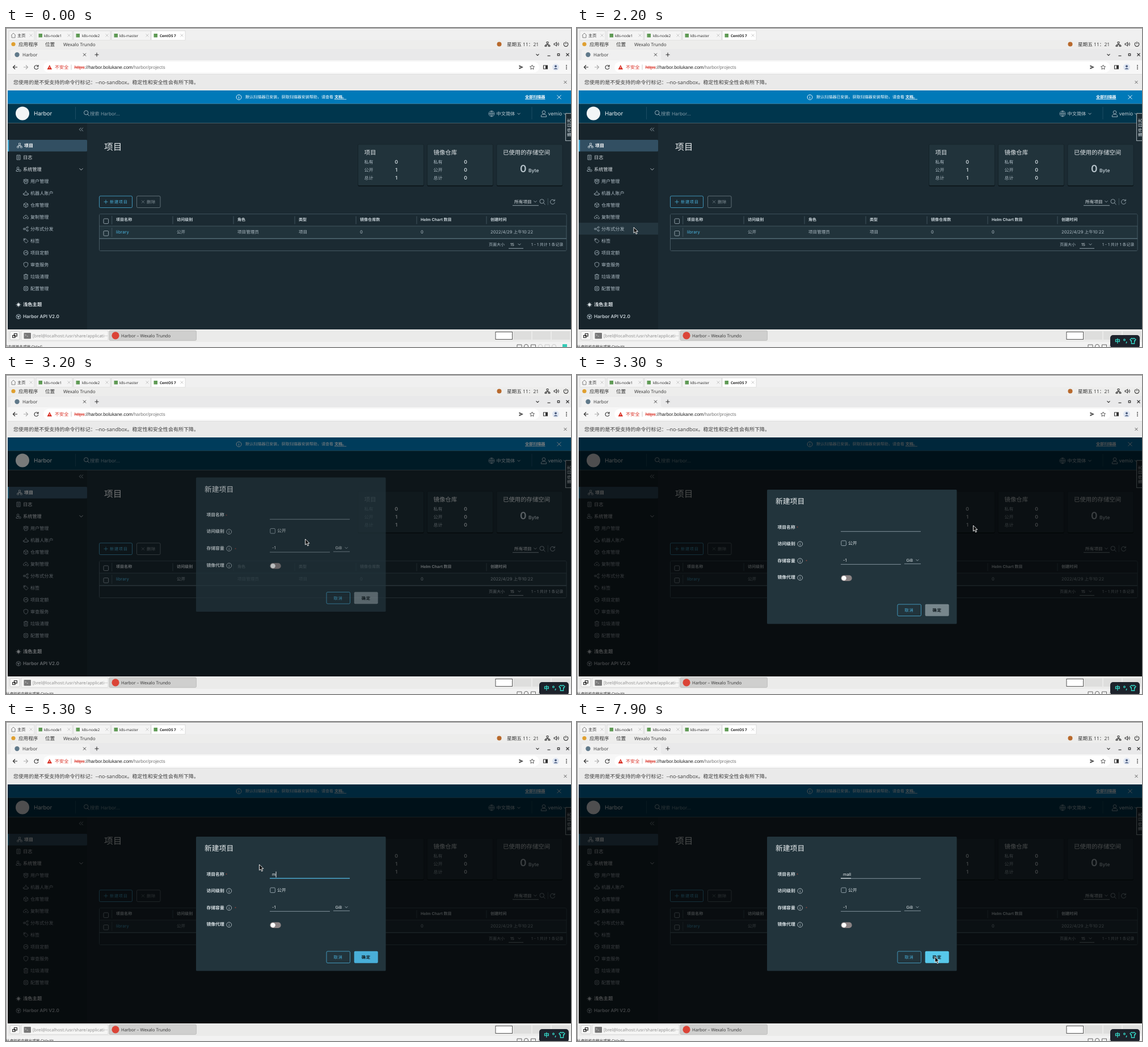
An HTML page that plays this animation: 996x562 px, repeating every 8 s.

```html
<!DOCTYPE html>
<html>
<head>
<meta charset="utf-8">
<title>Harbor</title>
<style>
html, body { margin: 0; width: 100%; height: 100%; overflow: hidden; background: #1b2a32; }
svg { display: block; width: 100vw; height: 100vh; text-rendering: geometricPrecision; }
text { white-space: pre; }
.ui { font-family: Inter, 'Noto Sans CJK SC', 'Noto Sans CJK', sans-serif; }
.os { font-family: 'Open Sans', 'Noto Sans CJK SC', 'Noto Sans CJK', sans-serif; }
.url { font-family: 'Liberation Sans', 'Noto Sans CJK SC', sans-serif; }
</style>
</head>
<body>
<svg id="stage" viewBox="0 0 996 562"></svg>
<script>
const BLUE = '#49afd9', PALE = '#adbbc4', LINE = '#4b5f69', INK = '#333';
const CHEVRON = 'M-2.5-1.2L0 1.3L2.5-1.2', CROSS = 'M-2.5-2.5L2.5 2.5M2.5-2.5L-2.5 2.5';
const ring = (r, x = 0, y = 0) => `M${x - r} ${y}a${r} ${r} 0 1 0 ${2 * r} 0a${r} ${r} 0 1 0 ${-2 * r} 0`;
const SEARCH = ring(3.7, -.8, -.8) + 'M1.9 1.9L5 5';
const INFO = ring(4.4) + 'M0-.8V2.6M0-2.6V-1.8';

const text = (x, y, s, size, fill, weight = 400, more = '') =>
  `<text x="${x}" y="${y}" font-size="${size}" fill="${fill}" font-weight="${weight}" ${more}>${s}</text>`;
const box = (x, y, w, h, fill, more = '') =>
  `<rect x="${x}" y="${y}" width="${w}" height="${h}" fill="${fill}" ${more}/>`;
const frame = (x, y, w, h, stroke, rx = 2) => box(x, y, w, h, 'none', `stroke="${stroke}" rx="${rx}" stroke-width=".8"`);
const icon = (x, y, d, stroke, width = .8, more = '') =>
  `<path transform="translate(${x} ${y})" d="${d}" fill="none" stroke="${stroke}" stroke-width="${width}" ${more}/>`;
const line = (x1, y1, x2, y2, stroke, width = .8, more = '') =>
  icon(0, 0, `M${x1} ${y1}L${x2} ${y2}`, stroke, width, more);
const dot = (x, y, r, fill) => `<circle cx="${x}" cy="${y}" r="${r}" fill="${fill}"/>`;
const group = (cls, s, id = '') => `<g class="${cls}" ${id && `id="${id}"`}>${s}</g>`;

function machineTabs() {
  let s = box(0, 0, 996, 562, '#f0f0f0');
  const tabs = [[5, 45, '主页', 20], [53, 64, 'k8s-node1', 67], [119, 65, 'k8s-node2', 134],
    [186, 69, 'k8s-master', 200], [256, 60, 'CentOS 7', 271]];
  tabs.forEach(([x, w, name, tx], i) => {
    const active = i == 4;
    s += box(x, 5, w, 16.5, active ? '#fff' : '#f4f4f4', 'stroke="#d0d0d0" stroke-width=".7"');
    s += i ? box(x + 4.5, 10, 6.5, 6.5, '#5f9a55') : icon(13, 13, 'M-4 0L0-4L4 0M-3-.5V4H3V-.5', '#666');
    s += text(tx, 15.7, name, i ? 6.4 : 7.2, '#222', active ? 700 : 500);
    s += icon(x + w - 6, 13, CROSS, '#aaa', .6);
  });
  return s;
}

function desktopBar() {
  return box(3, 21.5, 993, 15.5, '#ededec') + dot(13, 28.5, 3.6, '#e0a030') +
    text(22, 31.6, '应用程序', 8.6, INK) + text(69, 31.6, '位置', 8.6, INK) +
    text(101, 31.6, 'Wexalo Trundo', 8.1, INK) + dot(869.5, 28.5, 4, '#b8692c') +
    text(883, 31.6, '星期五 11：21', 8.6, INK) +
    icon(954.5, 28.5, 'M-1.5-4H1.5V-1H-1.5ZM0-1V1M-3 2V1H3V2M-4.5 2H-1.5V4H-4.5ZM1.5 2H4.5V4H1.5Z', INK, 1) +
    icon(970, 28.5, 'M-4-1.2H-2L.5-3.5V3.5L-2 1.2H-4ZM2-1.5Q3 0 2 1.5M3.5-3Q5.5 0 3.5 3', INK, 1) +
    icon(987, 28.5, 'M-2-3A3.8 3.8 0 1 0 2-3M0-4.5V0', INK, 1.1);
}

function browser() {
  return box(3, 37, 993, 20, '#e9e9ea') +
    '<path d="M4 57Q8 57 8 53V42Q8 38 12 38H144Q148 38 148 42V53Q148 57 152 57Z" fill="#f0f0f0"/>' +
    dot(19.5, 47, 4.2, '#60798a') + text(29, 50, 'Harbor', 8, INK) +
    icon(138.5, 47, CROSS, '#444', 1) + icon(160, 47, 'M-3.5 0H3.5M0-3.5V3.5', INK, 1.1) +
    icon(937, 47, CHEVRON, INK, 1.2) + icon(957, 48, 'M-2.5 1H2.5', INK, 1.2) +
    icon(974, 47, 'M-1.7-1.7H1.7V1.7H-1.7Z', INK, 1.2) + icon(990, 47, CROSS, INK, 1.1) +
    box(3, 57, 993, 24.5, '#f7f7f7') + box(66, 59.5, 874, 19, '#fff', 'rx="9.5"') +
    icon(16, 69, 'M4 0H-3.5M0-3.5L-3.5 0L0 3.5', INK, 1.2) +
    icon(35, 69, 'M-4 0H3.5M0-3.5L3.5 0L0 3.5', '#aaa', 1.1) +
    icon(53.5, 69, 'M2.7-2A3.5 3.5 0 1 0 3.4 1M3.5-4V-1H.5', INK, 1.1) +
    '<path d="M72.5 73L76.8 65L81 73Z" fill="#d93025"/>' + line(76.8, 68, 76.8, 71, '#fff') +
    text(86, 72, '不安全', 8.1, '#d93025') + line(115, 64.5, 115, 73.5, '#bbb') +
    group('url', text(120.5, 72, '<tspan fill="#d93025" text-decoration="line-through">https</tspan>' +
      '://harbor.bolukane.com<tspan fill="#777">/harbor/projects</tspan>', 8.3, '#222')) +
    '<path d="M904.5 65.5L912 69L904.5 72.5V70L909 69L904.5 68Z" fill="#444"/>' +
    icon(927.5, 69, 'M0-4L1.2-1.3L4-1L1.9.9L2.5 3.8L0 2.3L-2.5 3.8L-1.9.9L-4-1L-1.2-1.3Z', '#444', .9) +
    icon(951, 69, 'M-3.5-3H3.5V3H-3.5Z', INK, 1.1) + box(951, 66, 3.5, 6, INK) +
    dot(969, 69, 6, '#dfe6f2') + dot(969, 67.3, 1.9, '#45577a') +
    '<path d="M965.5 72.5Q969 68.5 972.5 72.5Z" fill="#45577a"/>' +
    [66, 69, 72].map(y => dot(988, y, .9, INK)).join('') +
    box(3, 81.5, 993, 28.5, '#eaeaea') + line(3, 81.5, 996, 81.5, '#d8d8d8', .7) +
    text(13, 98.6, '您使用的是不受支持的命令行标记：--no-sandbox。稳定性和安全性会有所下降。', 9.05, '#3c3c3c') +
    icon(986, 95.5, CROSS, '#555', .9);
}

function pageHeader() {
  return box(3, 110, 993, 23.5, '#0079b8') + icon(410.5, 122, INFO, '#fff', .9) +
    text(422, 124.4, '默认扫描器已安装。获取扫描器安装帮助，请查看 <tspan font-weight="700" text-decoration="underline">文档。</tspan>', 7.05, '#fff', 500) +
    text(915, 124.4, '全部扫描器', 7.1, '#fff', 700, 'text-decoration="underline"') +
    icon(975, 121.8, 'M-3.5-3.5L3.5 3.5M3.5-3.5L-3.5 3.5', '#fff', .9) +
    box(3, 133.5, 993, 34, '#00364d') + dot(29, 150.5, 12, '#f2f5f6') +
    text(49, 153.8, 'Harbor', 9.8, '#f0f3f5') + line(122.5, 139, 122.5, 161, '#24536a') +
    icon(142, 150, SEARCH, PALE, .9) + text(148, 154, '搜索 Harbor...', 8.3, '#7f97a4') +
    icon(856, 151, ring(5) + 'M-5 0H5M0-5V5M0-5Q-5 0 0 5M0-5Q5 0 0 5', PALE, .7) +
    text(864.5, 154, '中文简体', 8.2, '#c0ccd3') + icon(904, 151, CHEVRON, PALE, .9) +
    line(927, 139, 927, 161, '#24536a') +
    icon(948, 151, ring(2.8, 0, -2.5) + 'M-4.6 5.5V3Q0-1.3 4.6 3V5.5Z', PALE, .9) +
    text(955.5, 154, 'vemio', 8.7, '#c0ccd3') + icon(985.5, 151, CHEVRON, PALE, .9);
}

function sidebar() {
  const glyphs = [
    ['用户管理', ring(1.5, 0, -2.4) + ring(1.2, -3, -2) + ring(1.2, 3, -2) + 'M-2.4 4V1.5Q0-.8 2.4 1.5V4ZM-4.5 2Q-4.5 0-2.5 0M4.5 2Q4.5 0 2.5 0'],
    ['机器人账户', 'M-3 3.5V0Q0-4 3 0V3.5ZM0-4.5V-2M-4.5 0V3M4.5 0V3M-1.2.8V1.6M1.2.8V1.6'],
    ['仓库管理', 'M0-4L3.6-2V2.2L0 4.2L-3.6 2.2V-2ZM-3.6-2L0 0L3.6-2M0 0V4'],
    ['复制管理', 'M-2 3Q-5 3-4.4.3Q-4-1-2.7-1Q-1.6-4 1.2-3Q3-2 3-.3Q5 .5 4 3H2M0 0V3.5M-1.4 1.4L0 0L1.4 1.4'],
    ['分布式分发', ring(1.4, -3, 0) + ring(1.4, 2.8, -2.8) + ring(1.4, 2.8, 2.8) + 'M-1.7-.6L1.5-2.2M-1.7.6L1.5 2.2'],
    ['标签', 'M-3.8-3.8H-.4L4 .6L.6 4L-3.8-.4Z' + ring(.6, -2, -2)],
    ['项目定额', ring(4) + 'M-3.5 1.5Q0-2 3.5 1.5M0 0L2-2'],
    ['审查服务', 'M0-4.3L3.7-3V0Q3.5 3 0 4.3Q-3.5 3-3.7 0V-3Z'],
    ['垃圾清理', 'M-4-3H4M-1.3-3V-4.2H1.3V-3M-3-3V4.2H3V-3M-1-1V2.6M1-1V2.6'],
    ['配置管理', ring(4) + ring(1.7) + 'M-3.5-3.2L-2.4-2.4M3.5-3.2L2.4-2.4M-3.5 3.2L-2.4 2.4M3.5 3.2L2.4 2.4']];
  return box(3, 167.5, 140, 363.5, '#17242b') +
    icon(132.5, 178.7, 'M-.3-3L-3.3 0L-.3 3M3.3-3L.3 0L3.3 3', PALE) +
    box(3, 197, 140, 20.5, '#324f62', 'rx="1.5"') + box(3, 197, 2.2, 20.5, BLUE) +
    box(3, 0, 140, 21, '#24363f', 'id="row" visibility="hidden"') +
    icon(24, 207, 'M-1.5-4H1.5V-1H-1.5ZM0-1V1M-3 1.5V.5H3V1.5M-4.3 1.5H-1.5V4H-4.3ZM1.5 1.5H4.3V4H1.5Z', '#d5dee3') +
    text(32, 209.8, '项目', 8, '#fff', 700) +
    icon(22, 228, 'M-3-4H3V4H-3ZM-1.5-2H1.5M-1.5 0H1.5M-1.5 2H1.5', PALE) + text(30, 231, '日志', 8.2, '#e0e6ea', 500) +
    icon(22, 249, ring(1.9, -1, -2.2) + 'M-4 3.5V1.5Q-1-1 1 .8M-4 3.5H0' + ring(1.7, 2.5, 2.2), PALE) +
    text(30, 251.8, '系统管理', 8.2, '#e0e6ea', 500) + icon(132.5, 248.8, 'M-3-1.5L0 1.5L3-1.5', '#e0e6ea') +
    glyphs.map(([name, d], i) =>
      icon(35, 270 + i * 21, d, PALE, .75) + text(43, 272.8 + i * 21, name, 8.1, PALE)).join('') +
    dot(22, 487.5, 2.4, '#dfe6ea') + icon(22, 487.5, 'M0-4.5V4.5M-4.5 0H4.5M-3-3L3 3M3-3L-3 3', '#dfe6ea', .7) +
    text(30, 490.4, '浅色主题', 8.3, '#e0e6ea', 600) +
    icon(22, 508.5, ring(4) + 'M-3-2L0 0L3-2M0 0V4' + ring(1.3), PALE, .9) +
    text(30, 511.4, 'Harbor API V2.0', 8.2, '#c7d1d7', 600);
}

function card(x, title, values) {
  let s = box(x, 206, 116, 73, '#0a1216', 'rx="2"') + box(x, 205, 116, 72.5, '#21333b', 'rx="2" stroke="#142026" stroke-width=".6"') +
    text(x + 11, 222.5, title, 10.4, '#e3e8eb');
  if (values) values.forEach((v, i) => {
    s += text(x + 11, 238.6 + i * 14, ['私有', '公开', '总计'][i], 8, PALE) +
      text(x + 67.5, 238.7 + i * 14, v, 8.7, '#d0d9de', 600, 'text-anchor="middle"');
  });
  else s += text(x + 41, 254.2, '0', 17.5, '#b9c6cd', 600) + text(x + 56, 254.2, 'Byte', 8.4, '#b9c6cd', 600);
  return s;
}

function projects() {
  const cols = [[194, '项目名称', 'library'], [301, '访问级别', '公开'], [408, '角色', '项目管理员'], [516, '类型', '项目'],
    [624, '镜像仓库数', '0'], [731, 'Helm Chart 数目', '0'], [854, '创建时间', '2022/4/29 上午10:22']];
  let s = box(143, 167.5, 853, 363.5, '#1b2a32') + text(173, 215.3, '项目', 15.7, '#e9edef') +
    card(620.5, '项目', [0, 1, 1]) + card(742.5, '镜像仓库', [0, 0, 0]) + card(865, '已使用的存储空间') +
    box(164.5, 296, 58, 20.5, '#20343e', 'id="hover" rx="2" visibility="hidden"') +
    frame(164.5, 296, 58, 20.5, BLUE) + icon(176, 306.2, 'M-3.5 0H3.5M0-3.5V3.5', BLUE) +
    text(183, 309, '新建项目', 7.2, BLUE, 500, 'letter-spacing=".7"') +
    frame(230.5, 296, 41.5, 20.5, '#718088') + icon(241.5, 306.2, CROSS, '#718088') +
    text(248, 309, '删除', 7.2, '#8b989f', 500, 'letter-spacing=".7"') +
    text(896, 308.5, '所有项目', 7.7, '#dfe6ea', 500) + icon(933, 305.6, CHEVRON, PALE) + line(893, 312.7, 939, 312.7, PALE) +
    icon(945.5, 306.2, SEARCH, PALE) + line(955.3, 300, 955.3, 312, LINE) +
    icon(963.5, 306.2, 'M3.2-2.4A4 4 0 1 0 4 1M3.8-4.5V-1.6H.8', PALE) +
    box(164.5, 327.8, 823.5, 64.7, '#21333b', `rx="2" stroke="${LINE}" stroke-width=".9"`) +
    box(165, 371.5, 822.5, 20.5, '#1b2a32') + box(165, 328.3, 822.5, 20.5, '#1b2a32') +
    line(164.5, 349, 988, 349, LINE) + line(164.5, 371, 988, 371, '#526873', 1.3) +
    line(186.7, 331, 186.7, 346, LINE) + line(186.7, 352, 186.7, 368, LINE);
  cols.forEach(([x, head, cell], i) => {
    if (i) s += line(x - 7, 331.5, x - 7, 345.5, LINE);
    s += text(x, 340.4, head, 7.05, '#c5d0d6', 700) + text(x, 361.6, cell, 7.6, i ? PALE : BLUE);
  });
  for (const y of [336, 357.5]) s += frame(172, y, 8.6, 8.6, PALE, 1.5);
  return s + text(851, 383.6, '页面大小', 7, PALE) + text(889, 384.4, '15', 7, '#d5dee3') + icon(905, 381, CHEVRON, PALE) +
    line(886, 388.3, 912, 388.3, PALE) + text(926, 383.6, '1 - 1 共计 1 条记录', 7, PALE) +
    box(986.5, 150.5, 14, 48, '#1b2a32', 'stroke="#98a5ab" stroke-width="1.2"') +
    text(0, 0, '事件日志', 8.2, '#d5dee3', 400, 'transform="translate(996 192) rotate(-90)"');
}

function modal() {
  const labels = ['项目名称', '访问级别', '存储容量', '镜像代理'];
  return box(335, 202, 334.5, 236.5, '#22343c', 'rx="1.5"') + text(350, 227.3, '新建项目', 12.8, '#eaeef0') +
    labels.map((s, i) => text(353.5, [270.6, 299.7, 329.6, 359.2][i], s, 7.8, '#d8e0e4', 700) +
      (i ? icon(393.2, [0, 297.6, 327.4, 357.2][i], INFO, '#c5d0d6') : '')).join('') +
    text(387, 271, '*', 6, '#a8483f') + text(403, 330, '*', 6, '#a8483f') +
    line(465, 275.7, 606, 275.7, PALE, .7) + line(465, 275.4, 606, 275.4, BLUE, 1.3, 'id="focus"') +
    text(469, 271.2, '', 7.3, '#eef2f4', 400, 'id="name"') + box(469, 263.5, .9, 10.3, '#fff', 'id="caret"') +
    frame(465.8, 292, 8.6, 8.6, PALE, 1.5) + text(478, 298.6, '公开', 7.8, '#d8e0e4') +
    text(469, 328.6, '-1', 7.4, '#e3e8eb') + line(465, 333.6, 571, 333.6, PALE, .7) +
    text(580.5, 328.6, 'GiB', 7.2, '#d8e0e4') + icon(600, 326, CHEVRON, PALE) + line(577, 332.7, 606, 332.7, PALE, .7) +
    box(465.3, 352.8, 19.4, 10.2, '#8a8283', 'rx="5.1"') + dot(470.6, 357.9, 4.2, '#fff') +
    frame(565, 404, 41.5, 20.5, BLUE) + text(577.5, 417, '取消', 7.3, BLUE, 500, 'letter-spacing=".8"') +
    box(613.7, 403.7, 42, 21, '#77868c', 'id="ok" rx="2"') + text(626.7, 417, '确定', 7.3, '#101a1f', 600, 'letter-spacing=".8"');
}

function taskbar() {
  let s = box(3, 531, 993, 22, '#ebebea') + box(7, 534.5, 17, 15, '#f6f6f5', 'stroke="#c8c8c7" stroke-width=".7" rx="2"') +
    icon(15.5, 542, 'M-1-3.5H3.8V.8H-1ZM-3.8-.5H.5V3.5H-3.8Z', '#222', 1.2) +
    box(27, 533, 153, 17.5, '#f5f5f4', 'rx="2" stroke="#d5d5d4" stroke-width=".7"') + box(31.5, 537, 12.5, 10.5, '#777', 'rx="1"') +
    icon(35, 541, 'M-1.5-1.5L.5 0L-1.5 1.5M1.5 2H4', '#ddd', .7) +
    text(47, 545, '[brel@localhost:/usr/share/applicati···', 7.6, '#8a8a8a') +
    box(182, 533, 153.5, 17.5, '#cfcfce', 'rx="2" stroke="#b5b5b4" stroke-width=".7"') + dot(193, 541.8, 6.6, '#db4437') +
    text(203, 545, 'Harbor – Wexalo Trundo', 7.7, INK);
  for (let i = 0; i < 4; i++)
    s += i ? box(860 + i * 34, 534.5, 32, 14.5, '#dededd') : box(863, 535.5, 29.5, 13, '#fff', 'stroke="#555"');
  s += box(0, 553, 996, 9, '#f2f2f2') + text(-3, 563.6, '', 6.6, '#222', 400, 'id="hint"');
  [905, 917, 929.5, 942, 954, 966].forEach((x, i) =>
    s += icon(x, 561, i % 2 ? ring(3.6) : 'M-4-3H4V3H-4Z', i > 2 ? '#c4c4c4' : '#555', .9));
  return s + box(981, 557, 8, 5, '#35cbb6') + line(.5, 0, .5, 562, '#8a8a8a', 1) + line(0, .5, 996, .5, '#8a8a8a', 1);
}

const inputPanel = box(940, 541, 52, 23, '#1d222b', 'rx="5"') + text(948, 555.2, '中', 9.8, '#35dccb', 700) +
  icon(965, 549.5, ring(1.4), '#35dccb', 1.1) + icon(969, 552.5, 'M0 0L-.8 3', '#35dccb', 1.5) +
  '<path d="M978.5 546.5Q980 549 981.5 546.5L985 548.8L983.6 551.4L982.6 550.8V556H977.4V550.8L976.4 551.4L975 548.8Z" fill="none" stroke="#35dccb" stroke-width="1.3"/>';

const stage = document.getElementById('stage');
stage.innerHTML = group('os', machineTabs() + desktopBar() + browser()) +
  group('ui', pageHeader() + projects() + sidebar()) +
  box(3, 110, 993, 421, '#000', 'id="shade"') + group('ui', modal(), 'modal') +
  group('os', taskbar()) + group('os', inputPanel, 'panel') +
  '<path id="cursor" d="M0 0V10.2L2.4 8L4.2 12L6 11.2L4.3 7.4H7.4Z" fill="#0b0b0b" stroke="#fff" stroke-width=".9"/>';

const el = {};
stage.querySelectorAll('[id]').forEach(node => el[node.id] = node);
const set = (id, attr, value) => el[id].setAttribute(attr, value);
const show = (id, on) => set(id, 'visibility', on ? 'visible' : 'hidden');

// Pointer waypoints: time, x, y
const path = [[1400, 951, 305], [1800, 560, 251], [2200, 100, 351], [2700, 209.5, 310.5], [3100, 209.5, 310.5],
  [3200, 527.5, 289], [3300, 698.5, 265], [3800, 540, 262], [4100, 500, 243], [4400, 480, 262], [4700, 446.5, 251],
  [6300, 446.5, 251], [6600, 434, 276], [7200, 620, 437], [7400, 631, 413.5], [8000, 631, 413.5]];

function pointer(t) {
  const i = Math.max(1, path.findIndex(p => p[0] > t));
  const [a, b] = [path[i - 1], path[i]], k = Math.max(0, (t - a[0]) / (b[0] - a[0]));
  return [a[1] + (b[1] - a[1]) * k, a[2] + (b[2] - a[2]) * k];
}

function draw(now) {
  const t = Math.floor(now % 8000 / 100) * 100;
  const [x, y] = pointer(t), active = t >= 1400, open = t >= 3200, entering = t < 3300;
  show('cursor', active);
  show('panel', active);
  set('cursor', 'transform', `translate(${x} ${y})`);
  el.hint.textContent = active ? '从虚拟机中移出或按 Ctrl+Alt' : '机内部单击或按 Ctrl+G';
  set('hint', 'x', active ? 0 : -3);

  show('row', active && !open && x < 143 && y > 259);
  set('row', 'y', 259 + 21 * Math.floor((y - 259) / 21));
  show('hover', active && !open && x > 164 && x < 223 && y > 296 && y < 317);

  show('shade', open);
  set('shade', 'opacity', entering ? .5 : .68);
  set('modal', 'display', open ? 'inline' : 'none');
  set('modal', 'opacity', entering ? .72 : 1);
  set('modal', 'transform', `translate(0 ${entering ? -21.5 : 0})`);

  el.name.textContent = t < 5300 ? '' : t < 5400 ? 'm' : t < 5500 ? 'ma' : 'mall';
  const since = t < 5300 ? t - 4400 : t - 5200;
  set('caret', 'x', 469.2 + (open ? el.name.getComputedTextLength() : 0));
  set('caret', 'opacity', t >= 4400 && t < 7400 && since % 1000 < 500 ? 1 : 0);
  set('focus', 'd', `M465 275.4H${t < 7400 ? 606 : 483}`);
  set('focus', 'stroke', t < 7900 ? BLUE : '#d5dee3');
  set('focus', 'opacity', t >= 4400 ? 1 : 0);
  set('ok', 'fill', t < 5300 ? '#77868c' : t < 7400 ? BLUE : '#57c8ea');
}

let start;
function tick(now) {
  start ??= now;
  draw(now - start);
  requestAnimationFrame(tick);
}
draw(0);
requestAnimationFrame(tick);
</script>
</body>
</html>
```
